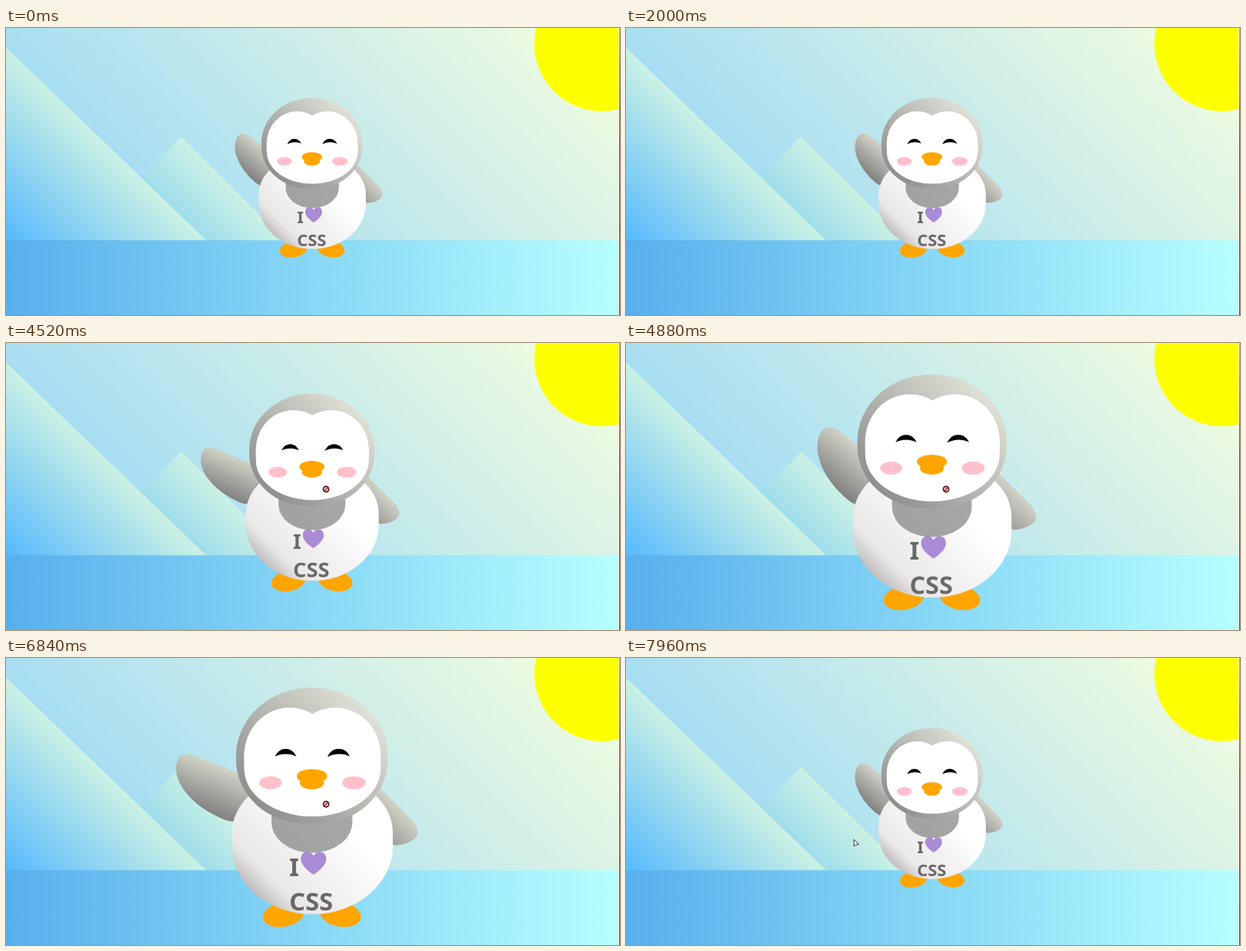
These frames come from a looping animation (800 px wide and 375 px high, 8 s). An HTML page:

```html
<!DOCTYPE html>
<html lang="en">
<head>
<meta charset="utf-8">
<title>Waving penguin</title>
<style>
:root { --face: white; --beak: orange; --skin: gray; }
html, body { margin: 0; width: 100%; height: 100%; overflow: hidden; }
body { position: relative; }
.page {
  position: absolute; left: 0; top: -1.05px;
  width: 908.9px; height: 600px; overflow: hidden;
  transform: scale(.878); transform-origin: 0 0;
  background: linear-gradient(45deg, rgb(118, 201, 255), rgb(247, 255, 222));
}
.page * { position: absolute; }
.mountain { width: 300px; height: 300px; }
.mountain.front {
  left: 0; top: 175px; z-index: 2; transform: skew(0deg, 44deg);
  background: linear-gradient(rgb(203, 241, 228), rgb(80, 183, 255));
}
.mountain.back {
  left: 110px; top: 225px; z-index: 1; transform: rotate(45deg);
  background: linear-gradient(rgb(203, 241, 228), rgb(47, 170, 255));
}
.sun { width: 200px; height: 200px; top: -75px; right: -75px; border-radius: 50%; background: yellow; }
.ground {
  left: 0; top: 317px; width: 100%; height: 300px; z-index: 3;
  background: linear-gradient(90deg, rgb(88, 175, 236), rgb(182, 255, 255));
}
.penguin { width: 300px; height: 300px; left: 304.45px; top: 75px; z-index: 4; }

.head {
  width: 50%; height: 45%; top: 10%; left: 25%; z-index: 1;
  border-radius: 70% 70% 65% 65%;
  background: linear-gradient(45deg, var(--skin), rgb(239, 240, 228));
}
.face { width: 60%; height: 70%; top: 15%; border-radius: 70% 70% 60% 60%; background: var(--face); }
.face.left, .chin { left: 5%; }
.face.right { right: 5%; }
.chin { width: 90%; height: 70%; top: 25%; border-radius: 70% 70% 100% 100%; background: var(--face); }
.eye { width: 15%; height: 17%; top: 45%; border-radius: 50%; background: black; }
.eye.left { left: 25%; }
.eye.right { right: 25%; }
.lid { width: 150%; height: 100%; top: 25%; left: -23%; border-radius: 50%; background: var(--face); }
.blush { width: 15%; height: 10%; top: 65%; border-radius: 50%; background: pink; }
.blush.left { left: 15%; }
.blush.right { right: 15%; }
.beak { height: 10%; border-radius: 50%; background: var(--beak); }
.beak.top { width: 20%; top: 60%; left: 40%; }
.beak.bottom { width: 16%; top: 65%; left: 42%; }

.shirt { left: 127.5px; top: 190px; z-index: 1; font: bold 25px/34px "Noto Sans", "Open Sans", sans-serif; color: #6a6969; }
.shirt br { position: static; }
.heart { left: 139.3px; top: 192.8px; width: 25.2px; height: 22.8px; z-index: 1; }

.body {
  width: 53%; height: 45%; top: 40%; left: 23.5%;
  border-radius: 80% 80% 100% 100%;
  background: linear-gradient(45deg, rgb(134, 133, 133) 0%, rgb(234, 231, 231) 25%, white 67%);
}
.body::before {
  content: ""; position: absolute; width: 50%; height: 45%; top: 10%; left: 25%;
  border-radius: 0 0 100% 100%; background: var(--skin); opacity: .7;
}
.arm {
  width: 30%; height: 60%; z-index: -1; border-radius: 30% 30% 30% 120%;
  background: linear-gradient(90deg, var(--skin), rgb(209, 210, 199));
}
.arm.left { top: 35%; left: 5%; transform-origin: top left; }
.arm.right { top: 0; right: -5%; transform: rotate(-45deg); }
.foot { width: 15%; height: 30%; top: 85%; z-index: -1; border-radius: 50%; background: var(--beak); }
.foot.left { left: 25%; transform: rotate(80deg); }
.foot.right { right: 25%; transform: rotate(-80deg); }

.edge { position: absolute; left: 798.7px; top: 0; width: 1.3px; height: 100%; background: linear-gradient(#8fa0b0, #3c4a66 40%, #34415e); }
.pointer { position: absolute; left: 0; top: 0; width: 14px; height: 14px; overflow: visible; }
</style>
</head>
<body>
<div class="page">
  <div class="mountain front"></div>
  <div class="mountain back"></div>
  <div class="sun"></div>
  <div class="penguin" id="penguin">
    <div class="head">
      <div class="face left"></div>
      <div class="face right"></div>
      <div class="chin"></div>
      <div class="eye left"><div class="lid"></div></div>
      <div class="eye right"><div class="lid"></div></div>
      <div class="blush left"></div>
      <div class="blush right"></div>
      <div class="beak top"></div>
      <div class="beak bottom"></div>
    </div>
    <div class="shirt">I<br>CSS</div>
    <svg class="heart" viewBox="0 0 50 45">
      <path fill="#a98bd6" d="M25 8C28 3 32 0 37 0C45 0 50 6 50 14C50 27 34 39 25 45C16 39 0 27 0 14C0 6 5 0 13 0C18 0 22 3 25 8Z"/>
    </svg>
    <div class="body">
      <div class="arm left" id="arm"></div>
      <div class="arm right"></div>
      <div class="foot left"></div>
      <div class="foot right"></div>
    </div>
  </div>
  <div class="ground"></div>
</div>
<div class="edge"></div>
<svg class="pointer" id="pointer">
  <path id="arrow" d="M0 0V9L2.3 7.2L6.2 6.4Z" fill="#fff" stroke="#333" stroke-width="1" stroke-linejoin="round"/>
  <g id="blocked">
    <circle r="3.6" fill="#e8d8d6" stroke="#5a1515" stroke-width="1.7"/>
    <path d="M-2 2L2 -2" stroke="#a02020" stroke-width="1.4"/>
  </g>
</svg>
<script>
const LOOP = 8000, WAVE = 3000, WAVE_START = 570;
const PRESS = 4033, RELEASE = 6890, GROW = 1000;
// pointer stops: time, x, y
const PATH = [[2300, 325, 380], [2560, 345, 295], [3200, 420, 196], [3600, 417, 191],
              [6890, 417, 191], [7320, 412, 199], [7900, 297, 237], [8000, 297, 237]];
const el = id => document.getElementById(id);
const penguin = el('penguin'), arm = el('arm');
const pointer = el('pointer'), arrow = el('arrow'), blocked = el('blocked');
const clamp = v => Math.min(1, Math.max(0, v));

// cubic-bezier(.42, 0, .58, 1)
function easeInOut(x) {
  let lo = 0, hi = 1;
  for (let i = 0; i < 24; i++) {
    const u = (lo + hi) / 2, v = 1 - u;
    if (1.26 * v * v * u + 1.74 * v * u * u + u * u * u < x) lo = u; else hi = u;
  }
  return lo * lo * (3 - 2 * lo);
}

// two dips of 20 degrees, then a rest
function armAngle(t) {
  const p = ((t - WAVE_START + WAVE) % WAVE) / 300;
  return p < 4 ? 130 - 20 * (1 - Math.abs(p % 2 - 1)) : 130;
}

function pointerAt(t) {
  const i = PATH.findIndex(p => p[0] > t);
  if (i < 1) return null;
  const [t0, x0, y0] = PATH[i - 1], [t1, x1, y1] = PATH[i];
  const k = (t - t0) / (t1 - t0);
  return [x0 + (x1 - x0) * k, y0 + (y1 - y0) * k];
}

function draw(t) {
  const size = 1 + 0.5 * (easeInOut(clamp((t - PRESS) / GROW)) - easeInOut(clamp((t - RELEASE) / GROW)));
  penguin.style.transform = `scale(${size})`;
  arm.style.transform = `rotate(${armAngle(t)}deg) scaleX(-1)`;

  const pos = pointerAt(t), pressed = t >= PRESS && t < RELEASE;
  pointer.style.display = pos ? '' : 'none';
  if (pos) pointer.style.transform = `translate(${pos[0]}px, ${pos[1]}px)`;
  arrow.style.display = pressed ? 'none' : '';
  blocked.style.display = pressed ? '' : 'none';
}

const start = performance.now();
function tick() {
  draw((performance.now() - start) % LOOP);
  requestAnimationFrame(tick);
}
tick();
</script>
</body>
</html>
```
